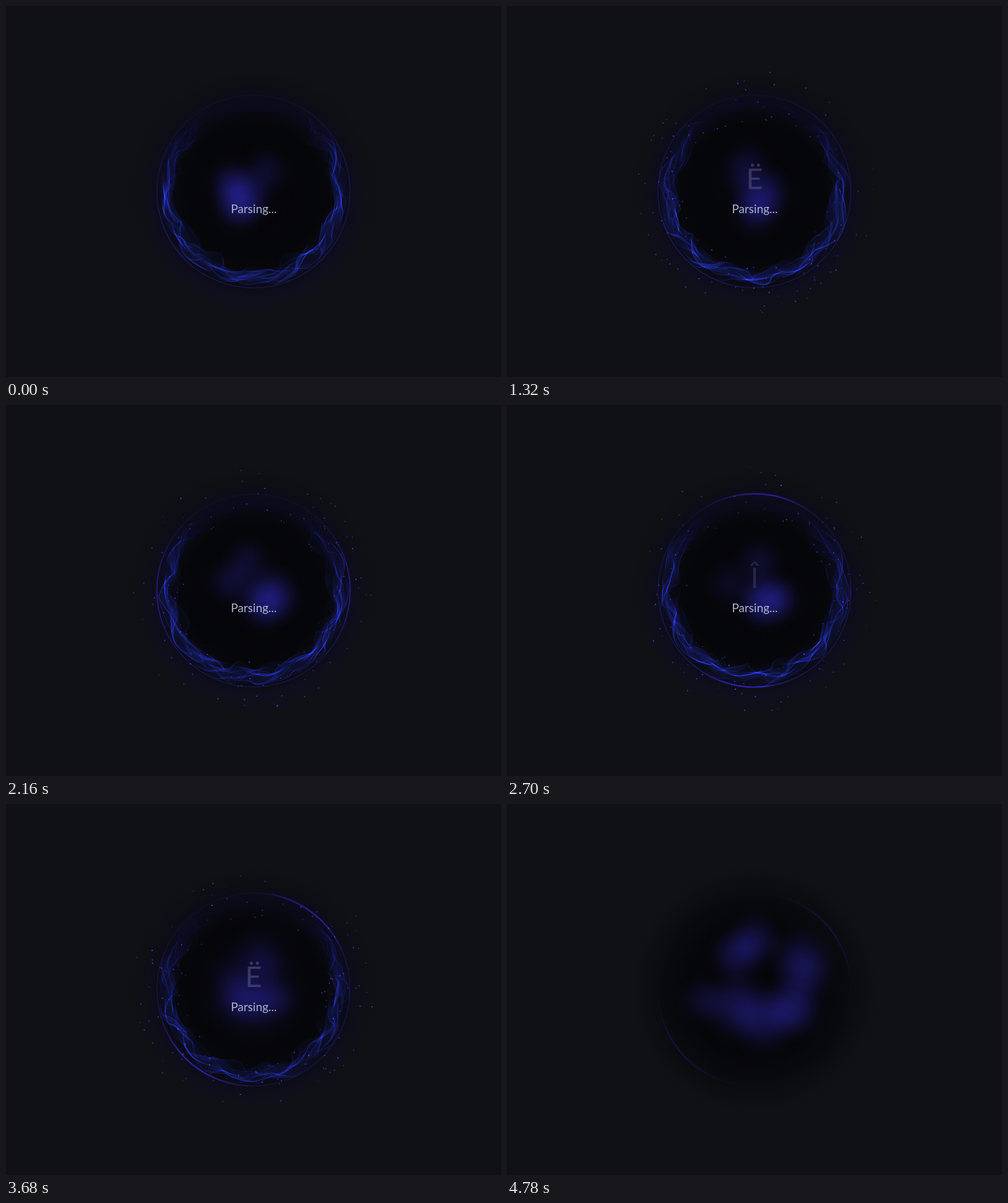
Animation of 800 by 600 pixels, one loop 4800 ms. Source, as an HTML page with a canvas:

```html
<!DOCTYPE html>
<html lang="en">
<head>
<meta charset="utf-8">
<title>Parsing</title>
<style>
  html, body { margin: 0; width: 100%; height: 100%; overflow: hidden; background: #101114; }
  canvas { display: block; }
</style>
</head>
<body>
<canvas id="stage" width="800" height="600"></canvas>
<script>
const ctx = document.getElementById('stage').getContext('2d');
const LOOP = 4800, CX = 400, CY = 300, R = 156, TAU = Math.PI * 2;
const { sin, cos, abs, exp, min, max, PI } = Math;

const clamp = v => min(1, max(0, v));
const ramp = (t, from, to) => {
  const p = clamp((t - from) / (to - from));
  return p * p * (3 - 2 * p);
};
const hash = n => {
  const v = sin(n * 127.1 + 11.7) * 43758.5453;
  return v - Math.floor(v);
};
const bump = (angle, centre, width) => {
  const d = Math.atan2(sin(angle - centre), cos(angle - centre)) / width;
  return exp(-d * d);
};
const mixKeys = (keys, t) => {
  const i = max(1, keys.findIndex(k => k[0] >= t));
  const [t0, v0] = keys[i - 1], [t1, v1] = keys[i];
  return v0 + (v1 - v0) * ramp(t, t0, t1);
};

function radial(x, y, radius, stops) {
  const g = ctx.createRadialGradient(x, y, 0, x, y, radius);
  stops.forEach(([at, color]) => g.addColorStop(at, color));
  ctx.fillStyle = g;
  ctx.fillRect(x - radius, y - radius, radius * 2, radius * 2);
}

function conic(color, alphaAt) {
  const g = ctx.createConicGradient(0, CX, CY), steps = 72;
  for (let i = 0; i <= steps; i++) {
    const a = clamp(alphaAt(i / steps * TAU));
    g.addColorStop(i / steps, `rgba(${color},${a.toFixed(4)})`);
  }
  return g;
}

function drawBackdrop(ringAlpha) {
  ctx.globalCompositeOperation = 'source-over';
  ctx.fillStyle = '#101114';
  ctx.fillRect(0, 0, 800, 600);
  radial(CX, CY, 215, [[0, 'rgba(2,2,6,.78)'], [.5, 'rgba(2,2,6,.74)'],
    [.7, 'rgba(4,4,9,.52)'], [.85, 'rgba(9,9,15,.25)'], [1, 'rgba(16,17,20,0)']]);
  ctx.globalCompositeOperation = 'lighter';
  radial(CX, CY + 12, 195, [[0, 'rgba(30,10,140,0)'], [.66, 'rgba(30,10,140,0)'],
    [.8, `rgba(30,10,140,${.085 * ringAlpha})`], [1, 'rgba(30,10,140,0)']]);
}

function blob(x, y, radius, alpha) {
  const tint = a => `rgba(38,32,160,${(a * alpha).toFixed(4)})`;
  radial(x, y, radius, [[0, tint(1)], [.3, tint(.82)], [.6, tint(.36)], [.82, tint(.1)], [1, tint(0)]]);
}

// End clouds: x, y, radius, alpha, horizontal drift, vertical drift
const clouds = [
  [362, 248, 52, .34, 10, -4], [402, 216, 50, .32, -2, 4], [452, 230, 60, .26, 22, 20],
  [470, 282, 54, .26, 12, -6], [452, 332, 58, .48, 8, -2], [368, 330, 64, .36, 4, -4],
  [410, 350, 62, .34, 4, 0], [326, 328, 46, .2, -8, -10]
];

function drawCore(t) {
  const phase = t / 4400 * TAU, s = t / 1000;
  const alive = 1 - ramp(t, 3450, 4150), dim = 1 - .35 * ramp(t, 2300, 3200);
  if (alive > 0) {
    blob(404 - 22 * cos(phase), 308 + 5 * sin(phase * 2), 56, .48 * dim * alive);
    blob(396 - 20 * cos(phase), 326 + 8 * sin(phase), 48, .24 * dim * alive);
    blob(402 + 18 * cos(phase * 1.3), 260 + 8 * cos(phase), 44, .22 * alive);
    blob(364 + 6 * sin(s * 1.4), 286 - 6 * sin(phase), 46, .25 * (.6 + .4 * cos(s * 2.9)) * alive);
    blob(440 + 5 * sin(s), 316, 42, .2 * ramp(t, 1700, 2900) * alive);
  }
  const grow = ramp(t, 3400, 4180), p = (t - 4220) / 560;
  if (grow > 0) clouds.forEach(([x, y, r, a, dx, dy]) =>
    blob(CX + (x + dx * p - CX) * (.5 + .5 * grow), CY + (y + dy * p - CY) * (.5 + .5 * grow), r, a * grow));
}

const wave = (a, seed, s) => (sin(3 * a + seed + s * 1.6) + sin(7 * a - seed * 2 - s * 1.9)
  + .8 * sin(11 * a + seed * 3 + s * 2.3) + .5 * sin(19 * a - seed - s * 2.8)) / 2.6;

// The ring is densest at the bottom and nearly open at the top.
const ringWeight = a => .04 + .96 * clamp(.52 + .5 * sin(a) + .22 * cos(2 * a));

function drawVeil(k, s, visible) {
  const lines = 40, points = 260, seed = k * 2.3 + .8;
  ctx.strokeStyle = conic('33,47,205', a => .068 * visible(a) * ringWeight(a)
    * max(.15, .75 + .4 * sin(4 * a + seed * 2 - s * 1.5) + .35 * sin(9 * a - seed + s)));
  ctx.lineWidth = 1;
  const rays = [];
  for (let i = 0; i < points; i++) {
    const a = i / points * TAU;
    rays.push([a, 9 + 9 * wave(a, seed, s), 17 + 9 * wave(a, seed + 4, s), 5 * a + seed + s * 1.5]);
  }
  for (let j = 0; j < lines; j++) {
    const u = j / (lines - 1);
    ctx.beginPath();
    for (const [a, near, width, twist] of rays) {
      const depth = abs(near + width * u + 3.5 * sin(twist * 2 + u * 5));
      const angle = a + .085 * sin(twist + u * 4) + .03 * sin(twist * 3 - u * 6);
      const r = R - depth;
      ctx.lineTo(CX + r * cos(angle), CY + r * sin(angle));
    }
    ctx.closePath();
    ctx.stroke();
  }
}

function circle(radius, width, style) {
  ctx.strokeStyle = style;
  ctx.lineWidth = width;
  ctx.beginPath();
  ctx.arc(CX, CY, radius, 0, TAU);
  ctx.stroke();
}

const glintKeys = [[0, .08], [580, 1], [1320, .08], [2160, .3], [3240, .95], [4220, .25], [4800, .25]];

function drawRing(t, alive) {
  const s = t / 1000, tail = .6 * (1 - ramp(t, 4150, 4700));
  const visible = a => max(alive, bump(a, 2.4, .42) * tail);
  if (alive > 0 || tail > 0) {
    for (let k = 0; k < 4; k++) drawVeil(k, s, visible);
    circle(R, 1.1, conic('35,45,215', a => alive * (.1 + .25 * ringWeight(a))));
  }
  // Two opposite highlights sweep counter-clockwise along the rim.
  const head = (59 - .152 * (t - 580)) * PI / 180, glint = mixKeys(glintKeys, t);
  const arc = a => bump(a, head, .42) + bump(a, head + PI, .42);
  circle(R + .5, 5, conic('50,20,230', a => .14 * glint * arc(a)));
  circle(R + .5, 1.5, conic('66,36,255', a => .75 * glint * arc(a)));
}

function drawSparks(t) {
  const shown = ramp(t, 0, 380) * (1 - ramp(t, 3850, 4180));
  if (!shown) return;
  for (let i = 0; i < 125; i++) {
    const life = 900 + 500 * hash(i), clock = t / life + hash(i + 300);
    const cycle = Math.floor(clock), p = clock - cycle, id = i * 7 + cycle * 911;
    const angle = hash(id) * TAU + (hash(id + 1) - .5) * .3 * p;
    const r = 112 + 78 * hash(id + 2) + (hash(id + 3) - .25) * 34 * p;
    ctx.fillStyle = `rgba(84,52,240,${(shown * sin(PI * p) ** .6 * (.5 + .5 * hash(id + 4))).toFixed(3)})`;
    ctx.beginPath();
    ctx.arc(CX + r * cos(angle), CY + r * sin(angle), .75 + .4 * hash(id + 5), 0, TAU);
    ctx.fill();
  }
}

function drawText(t) {
  ctx.globalCompositeOperation = 'source-over';
  ctx.textAlign = 'center';
  const slot = (t - 210) / 650, index = Math.floor(slot);
  if (index >= 0 && index < 7) {
    ctx.font = '400 47px Lato, sans-serif';
    ctx.fillStyle = `rgba(140,146,172,${.36 * sin(PI * (slot - index)) ** .8})`;
    ctx.fillText('ÁËÛÎ'[index % 4], index % 4 ? 400 : 396.5, 296);
  }
  ctx.font = '19px Lato, sans-serif';
  ctx.fillStyle = `rgba(178,186,214,${.95 * (1 - ramp(t, 3800, 4150))})`;
  ctx.fillText('Parsing...', 400.5, 335);
}

const start = performance.now();

function frame(now) {
  const t = max(0, now - start) % LOOP, alive = 1 - ramp(t, 3500, 4170);
  drawBackdrop(alive);
  drawCore(t);
  drawRing(t, alive);
  drawSparks(t);
  drawText(t);
  requestAnimationFrame(frame);
}

requestAnimationFrame(frame);
</script>
</body>
</html>
```
